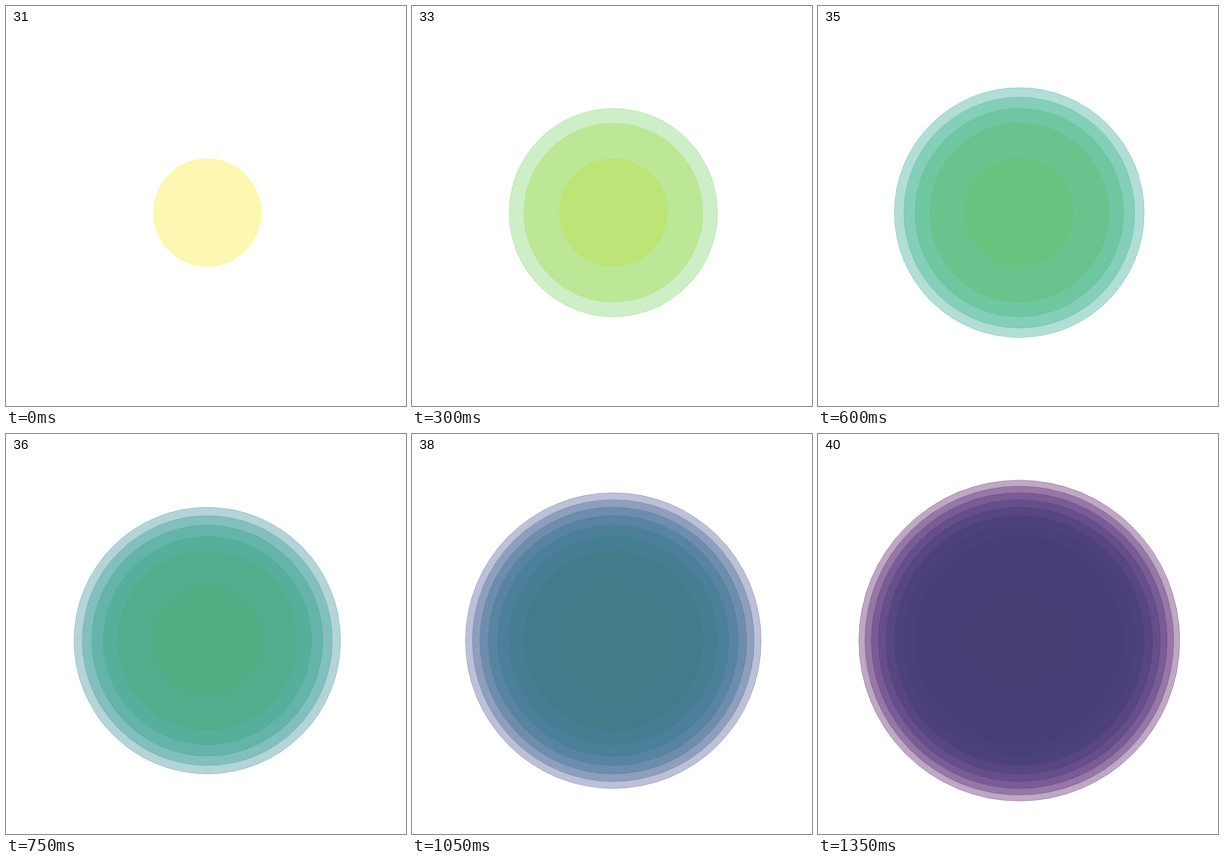
These frames come from a looping animation (400 px wide and 400 px high, 1.5 s). An HTML page:

```html
<!DOCTYPE html>
<html lang="en">
<head>
<meta charset="utf-8">
<title>Growing circles</title>
<style>
  html, body { margin: 0; width: 100%; height: 100%; overflow: hidden; background: #fff; }
  svg { display: block; width: 100vw; height: 100vh; }
  text { font: 13.2px "Liberation Sans", Arial, sans-serif; }
  circle { fill-opacity: .34; stroke-opacity: .34; stroke-width: .7; }
</style>
</head>
<body>
<svg viewBox="0 0 400 400">
  <g id="discs"></g>
  <text id="label" x="7.6" y="15"></text>
</svg>
<script>
const STEP = 150;
const FIRST = 31;
const COLORS = ['#fde725', '#b4de2c', '#6dcd59', '#35b779', '#1f9e89',
                '#26828e', '#31688e', '#3e4a89', '#482878', '#440154'];
const group = document.getElementById('discs');
const label = document.getElementById('label');

// Radius follows a square-root size scale between the smallest and largest disc.
const radius = i => 54.2 + 106.6 * Math.sqrt(i / (COLORS.length - 1)) - 0.35;

const discs = COLORS.map((color, i) => {
  const disc = document.createElementNS('http://www.w3.org/2000/svg', 'circle');
  const attrs = { cx: 201.3, cy: 206.6, r: radius(i), fill: color, stroke: color };
  for (const [name, value] of Object.entries(attrs)) disc.setAttribute(name, value);
  return group.appendChild(disc);
});

function render(ms) {
  const current = Math.floor(ms / STEP) % COLORS.length;
  discs.forEach((disc, i) => disc.setAttribute('display', i <= current ? 'inline' : 'none'));
  label.textContent = FIRST + current;
}

const start = performance.now();
function tick() {
  render(performance.now() - start);
  requestAnimationFrame(tick);
}
tick();
</script>
</body>
</html>
```
